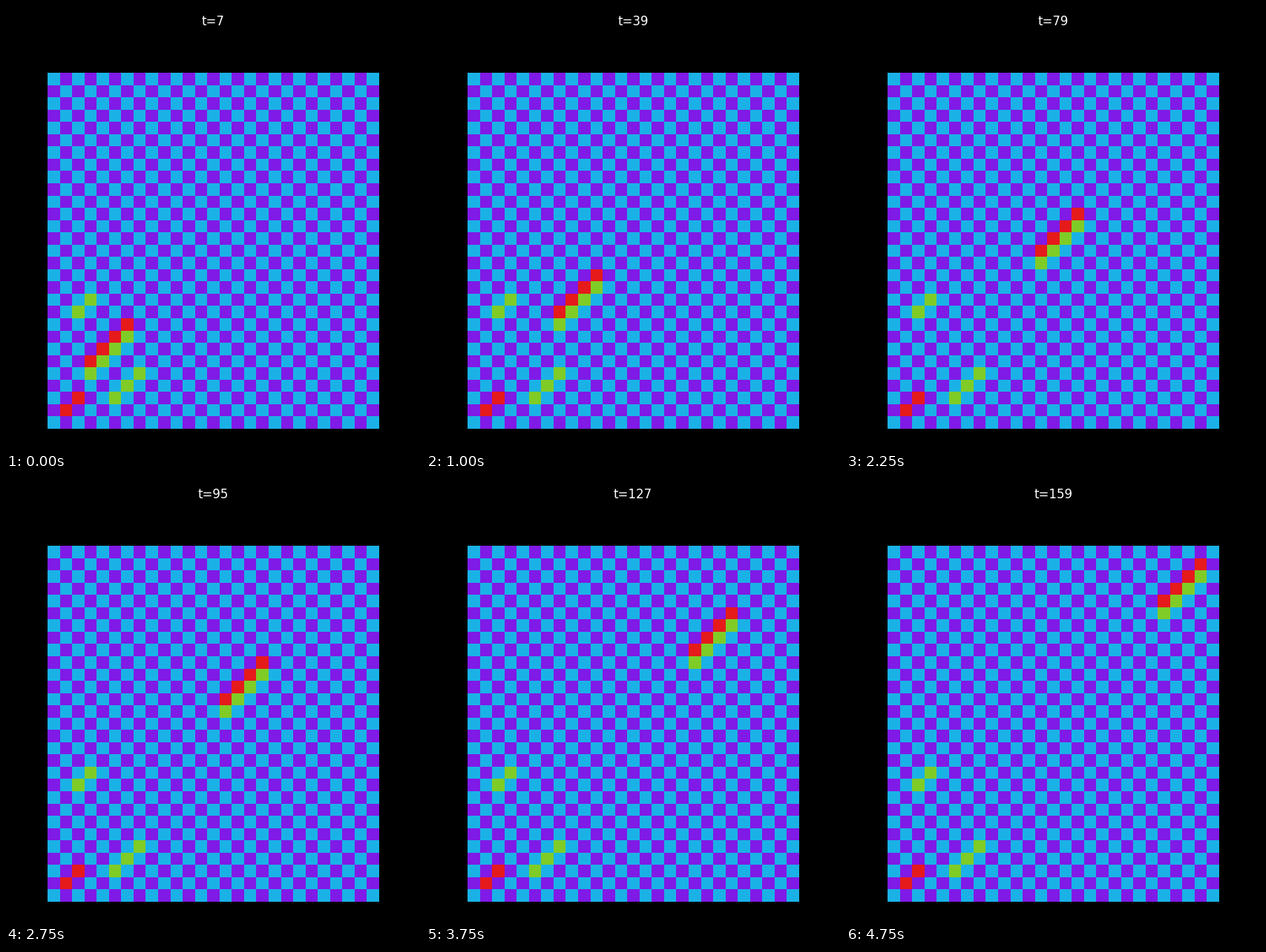
Animation, 558 px wide and 600 px high, one loop 5000 ms. Source, as a matplotlib script:

```python
import numpy as np
import matplotlib.pyplot as plt
from matplotlib.animation import FuncAnimation

W, H, DPI = 558, 600, 100
COLS, ROWS = 27, 29
LEFT, BOTTOM, GRID_W, GRID_H = 56, 30, 447, 480
FRAMES, STEP, START = 20, 8, 7

CYAN, PURPLE = (26, 178, 230), (128, 26, 230)
RED, GREEN = (230, 26, 26), (128, 204, 38)

# Cell index of every pixel column and row
px = ((np.arange(GRID_W) + 0.5) * COLS / GRID_W).astype(int)
py = ((np.arange(GRID_H) + 0.5) * ROWS / GRID_H).astype(int)


def diagonal(cells, col, row, length, color):
    """Colour cells upward to the right from (col, row)."""
    for i in range(length):
        cells[row - i, col + i] = color


def make_board():
    row, col = np.indices((ROWS, COLS))
    even = ((row + col) % 2 == 0)[..., None]
    cells = np.where(even, CYAN, PURPLE).astype(np.uint8)
    diagonal(cells, 2, 19, 2, GREEN)
    diagonal(cells, 1, 27, 2, RED)
    diagonal(cells, 5, 26, 3, GREEN)
    return cells


def render(k):
    cells = board.copy()
    diagonal(cells, 3 + k, 23 - k, 4, RED)
    diagonal(cells, 3 + k, 24 - k, 4, GREEN)
    return cells[np.ix_(py, px)]


board = make_board()
fig = plt.figure(figsize=(W / DPI, H / DPI), dpi=DPI, facecolor="black")
image = fig.figimage(render(0), LEFT, BOTTOM, origin="upper")
title = fig.suptitle(f"t={START}", color="white", fontsize=12,
                     family="DejaVu Sans")


def update(k):
    image.set_data(render(k))
    title.set_text(f"t={START + STEP * k}")
    return image, title


anim = FuncAnimation(fig, update, frames=FRAMES, interval=250,
                     repeat=True, repeat_delay=0, blit=False)
plt.show()
```
